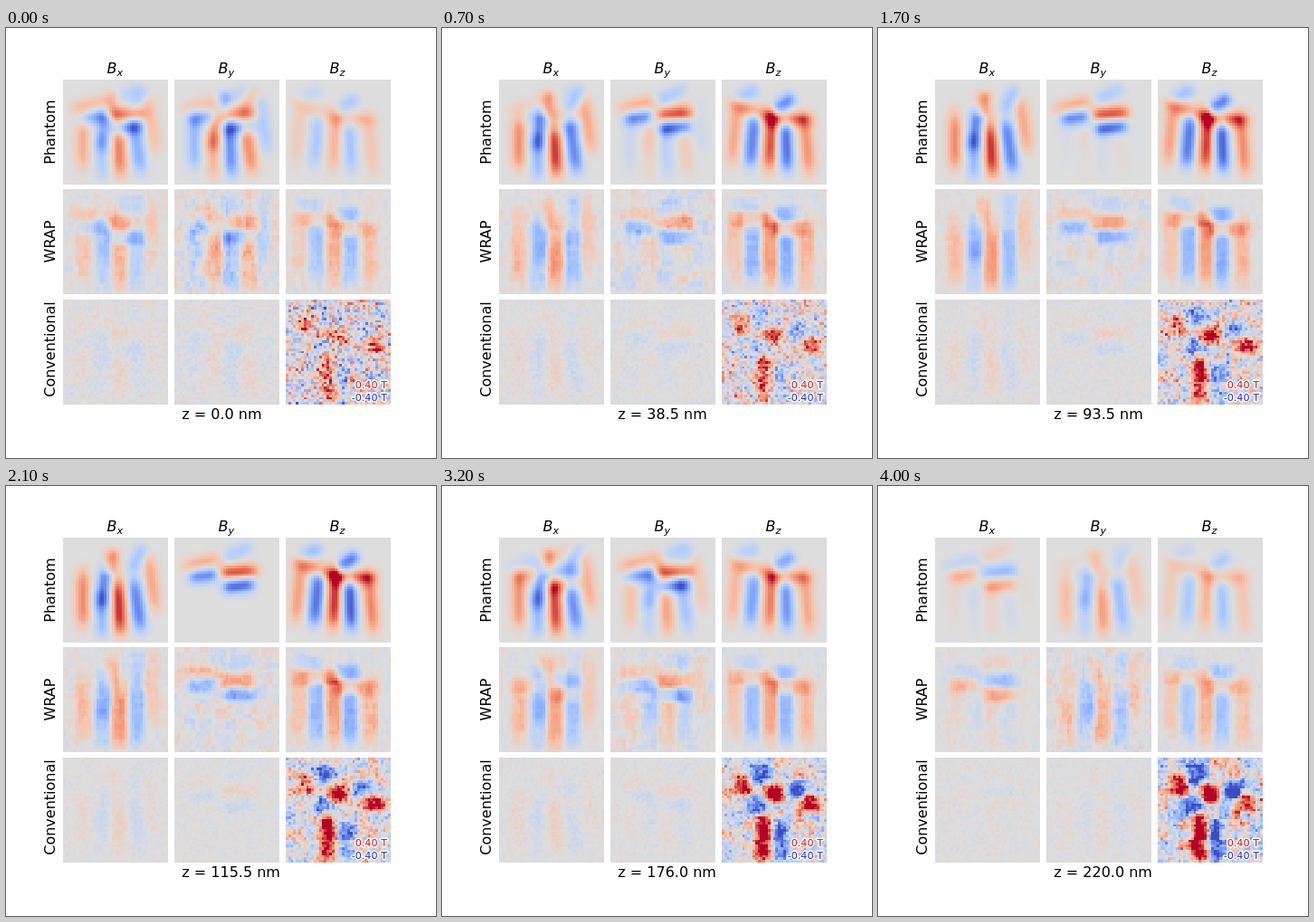
These frames come from a looping animation (475x475 px, 4.1 s). An HTML page with a canvas:

```html
<!DOCTYPE html>
<html lang="en">
<head>
<meta charset="utf-8">
<title>Field slices</title>
<style>
  html, body { margin: 0; width: 100%; height: 100%; overflow: hidden; background: #fff; }
  canvas { display: block; }
</style>
</head>
<body>
<canvas id="stage" width="475" height="475"></canvas>
<script>
const ctx = document.getElementById('stage').getContext('2d');
const CELLS = 41, PANEL = 116, SLICES = 41, STEP_MS = 100, STEP_NM = 5.5;
const COLS = [63, 186, 309], ROWS = [57, 178, 300];
const FONT = '"DejaVu Sans", Verdana, sans-serif';
const RAMP = ['#3b4cc0', '#6282ea', '#8db0fe', '#b8d0f9', '#dddddd', '#f5c4ad', '#f49a7b', '#de604d', '#b40426']
  .map(hex => [1, 3, 5].map(n => parseInt(hex.slice(n, n + 2), 16)));

// Streaks: x, y, half length, tilt in degrees, strength.
const UPRIGHT = [
  [22, 67, 32, 0, .6], [45, 54, 25, 8, -.75], [43, 85, 25, 0, -.45],
  [54, 27, 14, 8, .62], [62, 76, 31, -3, .95], [82, 74, 30, -8, -.77],
  [83, 23, 17, 28, -.38], [98, 49, 32, -8, .42]
];
const ACROSS = [
  [70, 38, 22, 87, .85], [71, 53, 18, 83, -.92], [33, 42, 18, 84, -.75],
  [30, 28, 22, 75, .4], [70, 16, 18, 65, -.28]
];
const AXIAL = [
  [54, 65, 35, 3, .9], [76, 44, 24, 90, .75], [33, 34, 25, 110, .62],
  [14, 61, 33, 5, .45], [94, 72, 33, -5, .58], [34, 66, 31, 5, -.82],
  [71, 72, 30, -3, -.92], [68, 27, 15, 55, -.78], [27, 17, 15, 60, -.38]
];
// Spots: x, y, half height, final strength.
const SPOTS = [
  [59, 41, 10, 1.6], [98, 51, 10, 1.3], [46, 87, 27, 1.5], [22, 30, 11, 1.2],
  [40, 54, 10, -1.4], [42, 19, 11, -1.2], [82, 36, 10, -1.25], [65, 92, 24, -1]
];

const KEYS = [0, 7, 21, 27, 37, 40];
const TURN = [-48, -14, 0, 8, 46, 78];
const IN_PLANE = [.95, .95, .95, .95, 1.02, .5];
const OUT_OF_PLANE = [.38, .9, 1, .97, .46, .38];

const mix = (a, b, t) => a + (b - a) * t;

function colour(value) {
  const p = (Math.max(-1, Math.min(1, value)) + 1) * 4;
  const i = Math.min(7, Math.floor(p));
  return RAMP[i].map((c, n) => mix(c, RAMP[i + 1][n], p - i));
}

function keyed(values, slice) {
  let i = 0;
  while (i < KEYS.length - 2 && slice >= KEYS[i + 1]) i++;
  return mix(values[i], values[i + 1], (slice - KEYS[i]) / (KEYS[i + 1] - KEYS[i]));
}

// Repeatable value in -1..1 for whole-number coordinates.
function random(x, y, z) {
  let h = Math.imul(x + 101, 374761393) ^ Math.imul(y + 57, 668265263) ^ Math.imul(z + 13, 1274126177);
  h = Math.imul(h ^ (h >>> 15), 2246822519);
  h = Math.imul(h ^ (h >>> 13), 3266489917);
  return ((h ^ (h >>> 16)) >>> 0) / 2147483648 - 1;
}

function drift(x, y, seed, slice, period) {
  const k = Math.floor(slice / period);
  return mix(random(x, y, seed * 97 + k), random(x, y, seed * 97 + k + 1), slice / period - k);
}

function fineNoise(i, j, seed, slice) {
  return (drift(i, j, seed, slice, 6) + drift(i, j, seed + 1, slice, 6) +
    .7 * drift(i >> 1, j, seed + 2, slice, 6) + .7 * drift(i, j >> 1, seed + 3, slice, 6)) / 2;
}

// Long vertical and horizontal patches.
function patchNoise(i, j, seed, slice) {
  const tall = drift(i >> 1, Math.floor((j + 4 * random(i >> 1, 0, seed)) / 6), seed, slice, 7);
  const wide = drift(Math.floor((i + 3 * random(0, j >> 1, seed)) / 7), j >> 1, seed + 1, slice, 7);
  return tall * .6 + wide * .4 + .35 * drift(i, j >> 1, seed + 2, slice, 5);
}

// Sum of streaks on the cell grid; the blocky form lines them up with the axes.
function streakMap(streaks, blocky) {
  const parts = streaks.map(([x, y, length, tilt, strength]) => {
    const a = (blocky ? Math.round(tilt / 90) * 90 : tilt) * Math.PI / 180;
    const stretch = blocky && tilt < 45 ? 1.15 : 1;
    return { x, y, length: length * stretch, strength, cos: Math.cos(a), sin: Math.sin(a) };
  });
  return gridMap((x, y) => parts.reduce((sum, p) => {
    const dx = x - p.x, dy = y - p.y;
    const u = ((dx * p.cos + dy * p.sin) / 8.5) ** 2;
    const v = ((dy * p.cos - dx * p.sin) / p.length) ** 2;
    return sum + p.strength * Math.exp(-(blocky ? u * u : u) - v * v);
  }, 0));
}

function gridMap(f) {
  const size = PANEL / CELLS;
  return Array.from({ length: CELLS * CELLS }, (_, n) =>
    f((n % CELLS + .5) * size, (Math.floor(n / CELLS) + .5) * size));
}

const [smooth, blocky] = [false, true].map(mode => ({
  upright: streakMap(UPRIGHT, mode),
  across: streakMap(ACROSS, mode),
  axial: streakMap(AXIAL, mode)
}));

const spot = ([x, y, tall, strength]) => gridMap((px, py) => {
  const rx = tall > 20 ? 8 : 11;
  return strength * Math.exp(-(((px - x) / rx) ** 2) - ((py - y) / tall) ** 4);
});
const addMaps = maps => maps[0].map((_, n) => maps.reduce((sum, m) => sum + m[n], 0));
const redSpots = addMaps(SPOTS.filter(s => s[3] > 0).map(spot));
const blueSpots = addMaps(SPOTS.filter(s => s[3] < 0).map(spot));

const buffer = document.createElement('canvas');
buffer.width = buffer.height = CELLS;
const bufferCtx = buffer.getContext('2d');
const image = bufferCtx.createImageData(CELLS, CELLS);

function drawPanel(col, row, valueAt) {
  for (let n = 0; n < CELLS * CELLS; n++) {
    const value = valueAt(n, n % CELLS, Math.floor(n / CELLS));
    image.data.set([...colour(value), 255], n * 4);
  }
  bufferCtx.putImageData(image, 0, 0);
  ctx.imageSmoothingEnabled = false;
  ctx.drawImage(buffer, COLS[col], ROWS[row], PANEL, PANEL);
}

// The in-plane components turn into each other with depth.
function components(maps, slice, inPlane, outOfPlane) {
  const turn = keyed(TURN, slice) * Math.PI / 180;
  const c = Math.cos(turn) * inPlane, s = Math.sin(turn) * inPlane;
  return [
    n => c * maps.upright[n] - s * maps.across[n],
    n => s * maps.upright[n] + c * maps.across[n],
    n => outOfPlane * maps.axial[n]
  ];
}

function drawFields(slice) {
  const flat = keyed(IN_PLANE, slice), axial = keyed(OUT_OF_PLANE, slice);
  const phantom = components(smooth, slice, flat, axial);
  const wrap = components(blocky, slice, .28 + .25 * flat, .3 + .25 * axial);
  const depth = slice / (SLICES - 1);

  for (let c = 0; c < 3; c++) {
    const patch = c === 1 ? .19 : .1;
    drawPanel(c, 0, phantom[c]);
    drawPanel(c, 1, (n, i, j) => wrap[c](n) + patch * patchNoise(i, j, 10 + c * 5, slice));
    if (c < 2) {
      drawPanel(c, 2, (n, i, j) => .15 * phantom[c](n) + .1 * fineNoise(i, j, 30 + c * 5, slice));
    }
  }
  drawPanel(2, 2, (n, i, j) =>
    mix(.45, 1, depth) * redSpots[n] + mix(.25, 1, depth) * blueSpots[n] +
    mix(.62, .48, depth) * fineNoise(i, j, 50, slice) +
    mix(.1, .4, depth) * drift(i >> 2, j >> 2, 60, slice, 20));
}

function text(str, x, y, size, align = 'left', style = '') {
  ctx.font = `${style} ${size}px ${FONT}`;
  ctx.textAlign = align;
  ctx.fillText(str, x, y);
}

function drawLabels(slice) {
  ctx.fillStyle = '#000';
  ['x', 'y', 'z'].forEach((axis, i) => {
    const x = COLS[i] + 48.5;
    text('B', x, 50, 16, 'left', 'italic');
    text(axis, x + 11, 52.5, 11.2, 'left', 'italic');
  });
  ['Phantom', 'WRAP', 'Conventional'].forEach((name, i) => {
    ctx.save();
    ctx.translate(54, ROWS[i] + (i === 2 ? 55 : 58));
    ctx.rotate(-Math.PI / 2);
    text(name, 0, 0, 16, 'center');
    ctx.restore();
  });
  text(`z = ${(slice * STEP_NM).toFixed(1)} nm`, 194.3, 432, 16);

  ctx.lineWidth = 3;
  ctx.lineJoin = 'round';
  ctx.strokeStyle = '#fff';
  ctx.font = `11.2px ${FONT}`;
  ctx.textAlign = 'right';
  [['0.40 T', 397.5, '#e01010'], ['-0.40 T', 411.5, '#2030dc']].forEach(([str, y, fill]) => {
    ctx.strokeText(str, 421, y);
    ctx.fillStyle = fill;
    ctx.fillText(str, 421, y);
  });
}

let shown = -1;
function tick() {
  const slice = Math.floor(performance.now() / STEP_MS) % SLICES;
  if (slice !== shown) {
    shown = slice;
    ctx.fillStyle = '#fff';
    ctx.fillRect(0, 0, 475, 475);
    drawFields(slice);
    drawLabels(slice);
  }
  requestAnimationFrame(tick);
}
tick();
</script>
</body>
</html>
```
